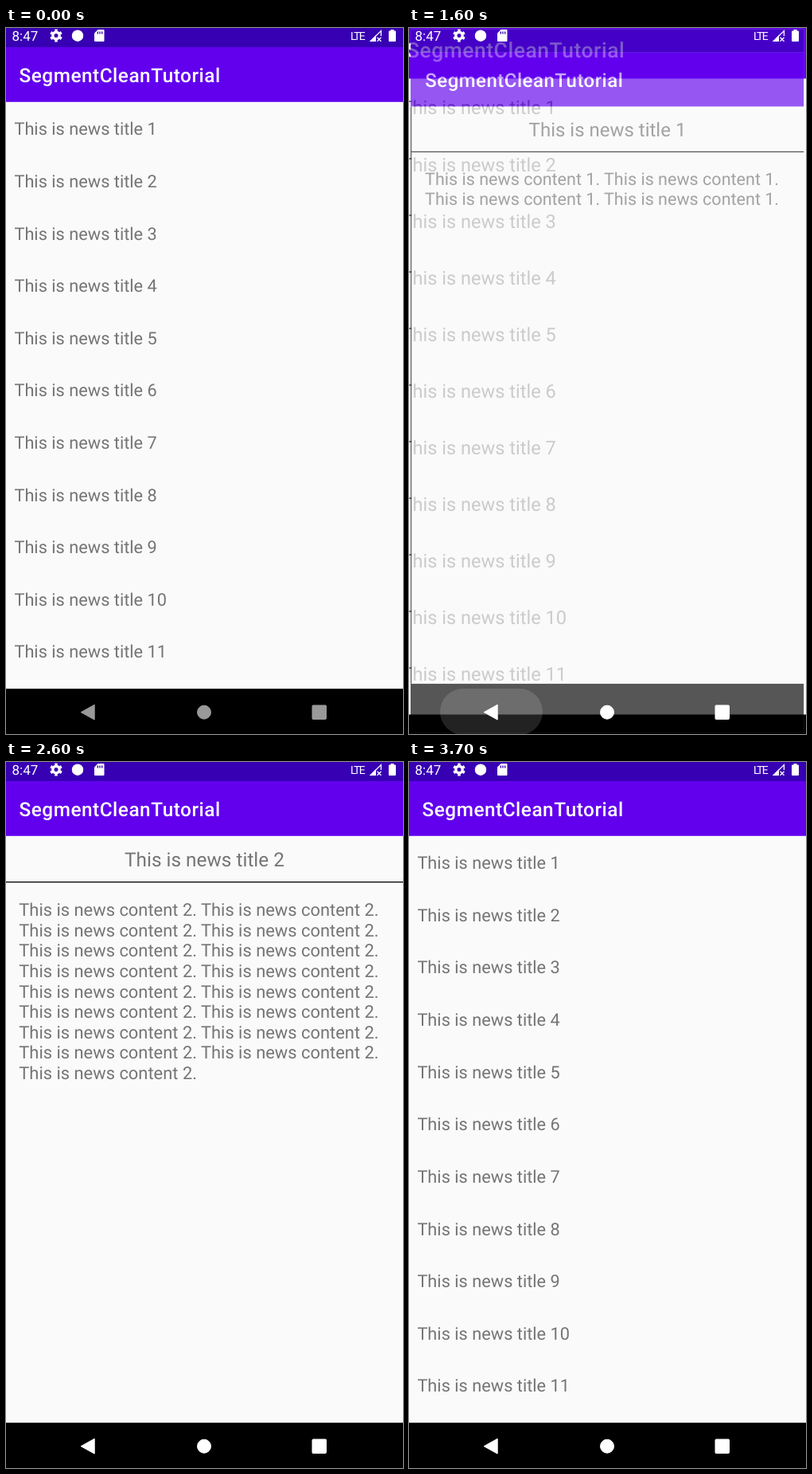
Animation, 499 px wide and 886 px high, one loop 4.1 s. Source, as an HTML page:

```html
<!DOCTYPE html>
<html lang="en">
<head>
<meta charset="utf-8">
<title>News list</title>
<style>
  html, body { margin: 0; width: 100%; height: 100%; overflow: hidden; background: #000; }
  svg { display: block; width: 499px; height: 886px; }
  text { font-family: Roboto, sans-serif; font-size: 21.9px; fill: #757575; text-rendering: geometricPrecision; }
  .row { font-size: 21.78px; }
  .bar { font-size: 24.4px; font-weight: 500; letter-spacing: .5px; fill: #fff; }
  .head { font-size: 24.4px; text-anchor: middle; }
  #status text { font-size: 17px; fill: #fff; }
  #status .net { font-size: 14px; letter-spacing: -1.6px; }
</style>
</head>
<body>
<svg viewBox="0 0 499 886">
  <g id="list"></g>
  <g id="detail1"></g>
  <g id="detail2"></g>
  <g id="status" fill="#fff">
    <text x="7.5" y="16">8:47</text>
    <g fill="none" stroke="#fff">
      <circle cx="63" cy="9.5" r="4.2" stroke-width="3.4"/>
      <circle cx="63" cy="9.5" r="6.6" stroke-width="2.6" pathLength="12" stroke-dasharray="1 1" stroke-dashoffset="-.5"/>
    </g>
    <circle cx="90" cy="9.7" r="7.2"/>
    <path d="M115.5 2H122.5Q123.5 2 123.5 3V16Q123.5 17 122.5 17H112Q111 17 111 16V6.5Z"/>
    <path d="M115.3 4.5v3M118 4.5v3M120.7 4.5v3" stroke="#3700b3" stroke-width="1.4"/>
    <text class="net" x="433" y="14.8">LTE</text>
    <path d="M457 17L465 9V17Z"/>
    <path d="M465 16.4H458.5L471.4 3.5V10M466.5 11.8l5 5m0-5l-5 5" fill="none" stroke="#fff" stroke-width="1.3"/>
    <path d="M483.5 3.5V2h4v1.5H489q1 0 1 1V16q0 1-1 1h-7q-1 0-1-1V4.5q0-1 1-1Z"/>
  </g>
  <rect id="ripple" x="39" y="829" width="129" height="58" rx="29" fill="#fff"/>
  <g id="nav" stroke-linejoin="round" stroke-width="1">
    <path d="M94.2 858.7L111.2 849.3V868.1Z"/>
    <circle cx="249" cy="858.7" r="8.5"/>
    <rect x="385" y="850" width="17.5" height="17.5" rx="1"/>
  </g>
</svg>
<script>
const LOOP = 4100, STEP = 100;
const $ = id => document.getElementById(id);
const clamp = v => Math.max(0, Math.min(1, v));
const rect = (y, h, fill, x = -2.1, w = 502.3) =>
  `<rect x="${x}" y="${y}" width="${w}" height="${h}" fill="${fill}"/>`;
const text = (x, y, s, cls = '') => `<text x="${x}" y="${y}" class="${cls}">${s}</text>`;

// Pages are slightly larger than the stage, so their edges show when they shrink.
const page = body => rect(-6, 898, '#fafafa') + rect(-6, 30, '#3700b3') + rect(24, 68.8, '#6200ee') +
  text(16.5, 68.2, 'SegmentCleanTutorial', 'bar') + body + rect(829.2, 63, '#000');

function detail(n, sentences) {
  const s = `This is news content ${n}.`;
  let body = text(249.5, 131.2, `This is news title ${n}`, 'head') +
    rect(150, 1.3, '#000') + rect(93, 736, '#000', -2.1, 1.2);
  for (let i = 0; i < sentences; i += 2)
    body += text(16.3, 193.1 + i / 2 * 25.6, i + 1 < sentences ? `${s} ${s}` : s);
  return page(body);
}

$('list').innerHTML = page(Array.from({ length: 11 }, (_, i) =>
  text(10.4, 134.3 + i * 65.6, `This is news title ${i + 1}`, 'row')).join(''));
$('detail1').innerHTML = detail(1, 4);
$('detail2').innerHTML = detail(2, 17);

const cubic = (u, a, b, c, d) => {
  const v = 1 - u;
  return v * v * v * a + 3 * v * v * u * b + 3 * v * u * u * c + u * u * u * d;
};

// Fast out, extra slow in: two joined Bezier segments.
function ease(x) {
  if (x <= 0) return 0;
  if (x >= 1) return 1;
  const [xs, ys] = x < 1 / 6
    ? [[0, .05, .1333, 1 / 6], [0, 0, .06, .4]]
    : [[1 / 6, .2083, .25, 1], [.4, .82, 1, 1]];
  let lo = 0, hi = 1;
  for (let i = 0; i < 30; i++) {
    const mid = (lo + hi) / 2;
    if (cubic(mid, ...xs) < x) lo = mid; else hi = mid;
  }
  return cubic(lo, ...ys);
}

const moves = [
  { start: 618, open: true, page: 'detail1' },
  { start: 1550, open: false, page: 'detail1' },
  { start: 2218, open: true, page: 'detail2' },
  { start: 3318, open: false, page: 'detail2' }
];
const presses = [1400, 3200];

function pose(id, scale, alpha) {
  $(id).setAttribute('transform', `translate(249.5 443) scale(${scale}) translate(-249.5 -443)`);
  $(id).setAttribute('opacity', alpha);
}

function draw(now) {
  const t = Math.floor(now % LOOP / STEP) * STEP;
  pose('list', 1, 1);
  pose('detail1', 1, 0);
  pose('detail2', 1, 0);

  const move = moves.filter(m => m.start < t).pop();
  if (move) {
    const age = t - move.start, p = ease(age / 400);
    if (move.open) {
      pose('list', 1 + .05 * p, 1);
      pose(move.page, .85 + .15 * p, clamp((age - 50) / 50));
    } else {
      pose('list', 1.1 - .1 * p, 1);
      pose(move.page, 1 - .1 * p, 1 - clamp((age - 35) / 43));
    }
  }

  const press = presses.filter(s => s <= t).pop();
  const held = t - press;
  $('ripple').setAttribute('opacity',
    press === undefined ? 0 : .2 * clamp(Math.min((held + 50) / 150, (400 - held) / 300)));
  const color = press === undefined ? '#999' : '#fff';
  $('nav').setAttribute('fill', color);
  $('nav').setAttribute('stroke', color);
  requestAnimationFrame(draw);
}
draw(0);
</script>
</body>
</html>
```
